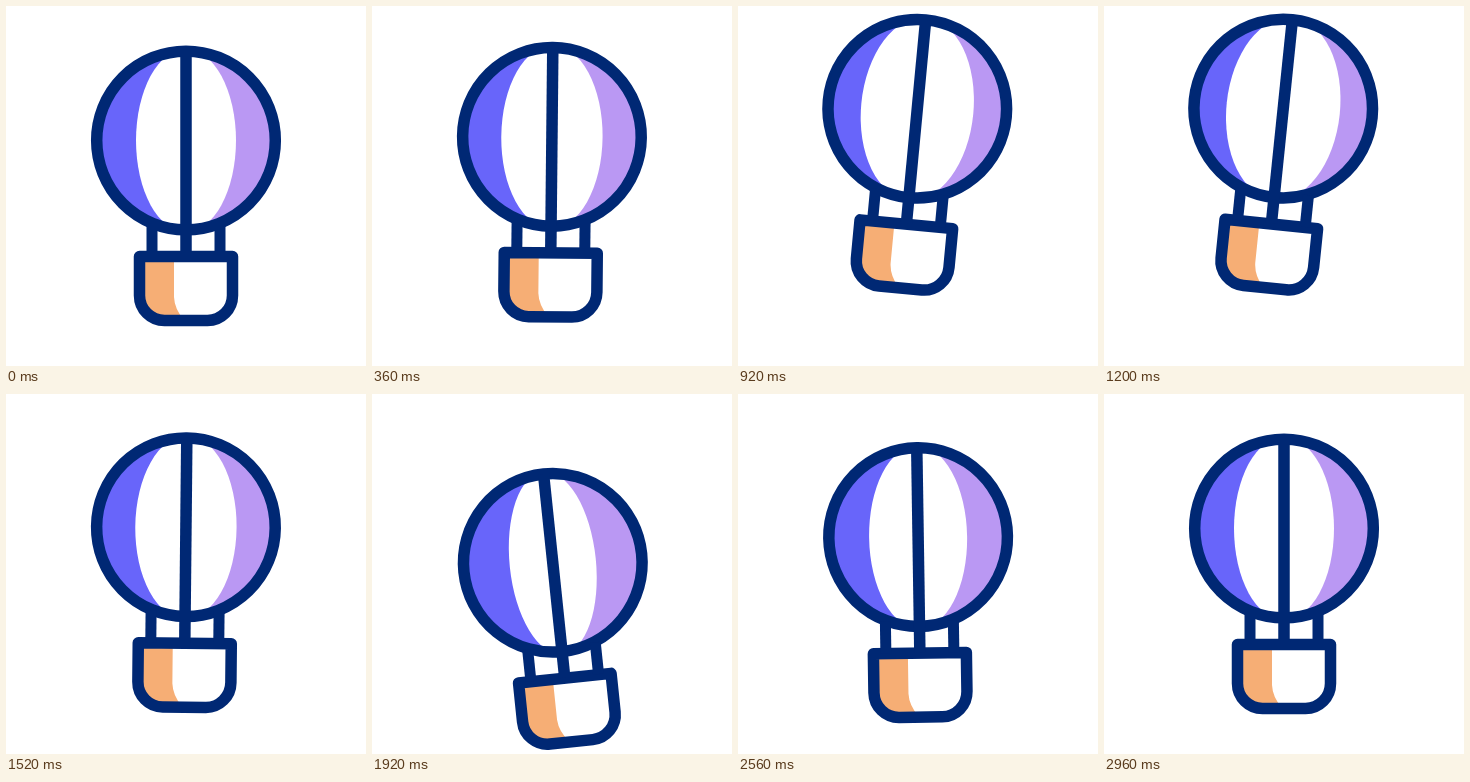
These frames come from a looping animation (360 px wide and 360 px high, 3000 ms). An HTML page with a canvas:

```html
<!DOCTYPE html>
<html lang="en">
<head>
<meta charset="utf-8">
<title>Hot air balloon</title>
<style>
  html, body { margin: 0; width: 100%; height: 100%; overflow: hidden; background: #fff; }
  canvas { display: block; width: 360px; height: 360px; }
</style>
</head>
<body>
<canvas id="stage"></canvas>
<script>
const SIZE = 360, LOOP = 3000, STEP = 40;
const NAVY = '#002874', BLUE = '#6865fa', LILAC = '#ba98f3', ORANGE = '#f6ae75';
const CX = 180, CY = 134.5, R = 89.3, PIVOT_Y = 127;

// [time, value] pairs, joined by sine easing
const LIFT = [[165, 0], [1090, -34.5], [1975, 35], [2850, 0]];
const TILT = [[170, 0], [1130, 6.1], [1955, -6], [2760, 0]];

const canvas = document.getElementById('stage');
const ctx = canvas.getContext('2d');
const dpr = window.devicePixelRatio || 1;
canvas.width = canvas.height = SIZE * dpr;

function track(keys, t) {
  if (t <= keys[0][0]) return keys[0][1];
  for (let i = 1; i < keys.length; i++) {
    const [t0, v0] = keys[i - 1], [t1, v1] = keys[i];
    if (t < t1) return v0 + (v1 - v0) * (1 - Math.cos(Math.PI * (t - t0) / (t1 - t0))) / 2;
  }
  return keys[keys.length - 1][1];
}

function line(x, y0, y1) {
  ctx.beginPath();
  ctx.moveTo(x, y0);
  ctx.lineTo(x, y1);
  ctx.stroke();
}

function basketPath() {
  const l = 133.5, r = 226.5, top = 250.5, bottom = 314.5, round = 25;
  ctx.beginPath();
  ctx.moveTo(l, top);
  ctx.lineTo(r, top);
  ctx.arcTo(r, bottom, l, bottom, round);
  ctx.arcTo(l, bottom, l, top, round);
  ctx.closePath();
}

function drawBasket() {
  ctx.save();
  basketPath();
  ctx.fillStyle = '#fff';
  ctx.fill();
  ctx.clip();
  ctx.fillStyle = ORANGE;
  ctx.beginPath();
  ctx.moveTo(130, 248);
  ctx.lineTo(168, 248);
  ctx.lineTo(168, 291);
  ctx.quadraticCurveTo(168.5, 303, 178, 314);
  ctx.lineTo(130, 314);
  ctx.fill();
  ctx.restore();
  basketPath();
  ctx.stroke();
}

function drawEnvelope(bandWidth) {
  ctx.save();
  ctx.beginPath();
  ctx.arc(CX, CY, R, 0, 2 * Math.PI);
  ctx.clip();
  ctx.fillStyle = BLUE;
  ctx.fillRect(CX - R, CY - R, R, 2 * R);
  ctx.fillStyle = LILAC;
  ctx.fillRect(CX, CY - R, R, 2 * R);
  ctx.fillStyle = '#fff';
  ctx.beginPath();
  ctx.ellipse(CX, CY, bandWidth, 91.5, 0, 0, 2 * Math.PI);
  ctx.fill();
  ctx.restore();
  ctx.beginPath();
  ctx.arc(CX, CY, R, 0, 2 * Math.PI);
  ctx.stroke();
}

function draw(t) {
  const tilt = track(TILT, t);
  ctx.setTransform(dpr, 0, 0, dpr, 0, 0);
  ctx.fillStyle = '#fff';
  ctx.fillRect(0, 0, SIZE, SIZE);
  ctx.translate(CX, PIVOT_Y + track(LIFT, t));
  ctx.rotate(tilt * Math.PI / 180);
  ctx.translate(-CX, -PIVOT_Y);
  ctx.strokeStyle = NAVY;
  ctx.lineWidth = 11.5;
  ctx.lineJoin = 'round';

  drawBasket();
  drawEnvelope(50 + 1.15 * tilt);
  line(CX, CY - R, 250);
  ctx.lineWidth = 11;
  line(CX - 34, 218, 250);
  line(CX + 34, 218, 250);
}

const start = performance.now();
function tick() {
  const t = (performance.now() - start) % LOOP;
  draw(Math.floor(t / STEP) * STEP);
  requestAnimationFrame(tick);
}
tick();
</script>
</body>
</html>
```
